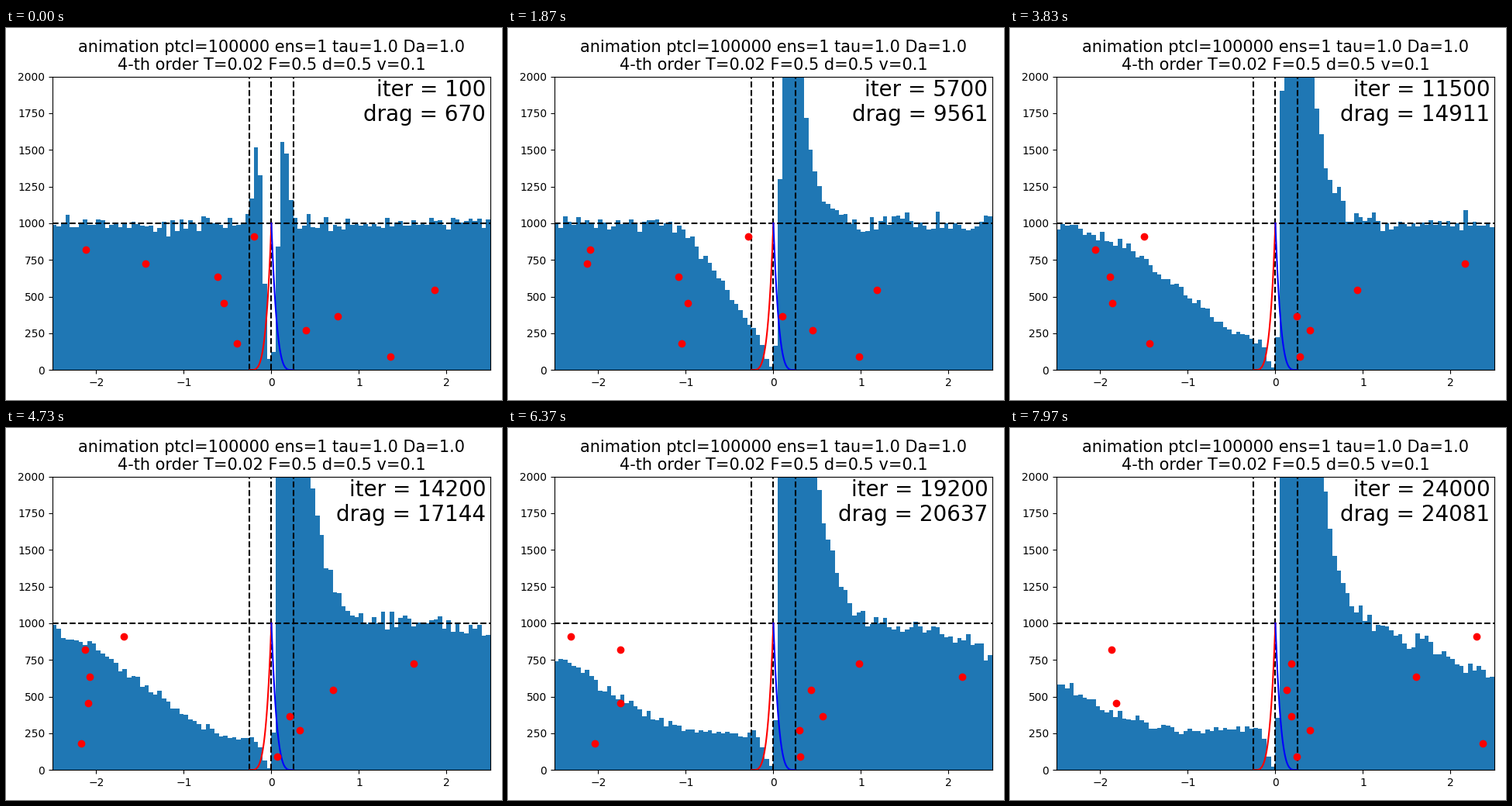
These frames come from a looping animation (640 by 480 pixels, 8 s). A matplotlib script:

```python
import numpy as np
import matplotlib.pyplot as plt
from matplotlib.animation import FuncAnimation

FRAMES, LOOP_MS = 240, 8000
STEP = 0.1                        # simulated time per frame
HALF, BINS, SUB = 2.5, 100, 5     # ring half-length, bars, nodes per bar
TEMP, SPEED, REACH, HEIGHT = 0.02, 0.1, 0.25, 0.125
LEVEL = 1000
GAP = 0.06                        # closest a tracer gets to the barrier
DRAG_FIRST, DRAG_LAST = 670, 24081

# Tracers from bottom to top; ends are unwrapped around the ring
STARTS = [1.36, -0.39, 0.39, 0.76, -0.54, 1.86, -0.61, -1.44, -2.12, -0.2]
ENDS = [0.24, -2.63, 0.39, 0.18, -1.82, 0.13, -3.39, -4.82, -1.87, -2.7]

rng = np.random.default_rng(7)
ticks = np.arange(FRAMES)
progress = ticks / (FRAMES - 1)


def bump(x):
    return np.clip(1 - np.abs(x) / REACH, 0, None) ** 4


def propagator(time, doublings=11):
    """Drift-diffusion over the given time on a periodic grid."""
    n = BINS * SUB
    dx = 2 * HALF / n
    i = np.arange(n)
    right = (i + 1) % n
    energy = HEIGHT * bump((i - n // 2) * dx)
    rise = (energy[right] - energy + SPEED * dx) / TEMP
    rate = TEMP / dx ** 2
    up = rate * rise / np.expm1(rise)
    down = rate * -rise / np.expm1(-rise)
    flow = np.zeros((n, n))
    flow[right, i] += up
    flow[i, i] -= up
    flow[i, right] += down
    flow[right, right] -= down
    step = np.eye(n) + flow * time / 2 ** doublings
    for _ in range(doublings):
        step = step @ step
    return step


def histograms():
    half_step = propagator(STEP / 2)
    step = half_step @ half_step
    density = half_step @ np.full(BINS * SUB, float(LEVEL))
    noise = rng.normal(size=BINS)
    rows = []
    for _ in ticks:
        density = step @ density
        mean = ((density + np.roll(density, -1)) / 2).reshape(BINS, SUB).mean(1)
        noise = 0.3 * noise + 0.95 * rng.normal(size=BINS)
        rows.append(np.clip(np.round(mean + noise * np.sqrt(mean)), 0, None))
    return rows


def bridge(memory, kick):
    """Random wander that starts and finishes at zero."""
    walk = np.zeros(FRAMES)
    for i in ticks[1:]:
        walk[i] = memory * walk[i - 1] + rng.normal(0, kick)
    return walk - walk[-1] * progress


def tracer(start, end):
    """Drift left until the end point is reached, with thermal wander."""
    path = np.maximum(start - SPEED * STEP * ticks, min(start, end))
    path += (end - path[-1]) * progress
    path += bridge(0.95, np.sqrt(2 * TEMP * STEP))
    low = GAP if start > 0 else GAP - 2 * HALF
    high = low + 2 * (HALF - GAP)
    path = low + np.abs(path - low)
    path = high - np.abs(high - path)
    return (path + HALF) % (2 * HALF) - HALF


def drag_counter():
    power = np.log(DRAG_LAST / DRAG_FIRST) / np.log(FRAMES)
    trend = DRAG_FIRST * (ticks + 1) ** power
    return np.round(trend + bridge(0, 1.5) * np.sqrt(trend)).astype(int)


counts = histograms()
dots_x = np.array([tracer(a, b) for a, b in zip(STARTS, ENDS)])
dots_y = LEVEL * np.arange(1, 11) / 11
drag = drag_counter()

fig, ax = plt.subplots(figsize=(6.4, 4.8), dpi=100)
ax.set_xlim(-HALF, HALF)
ax.set_ylim(0, 2 * LEVEL)
ax.set_title("animation ptcl=100000 ens=1 tau=1.0 Da=1.0\n"
             "4-th order T=0.02 F=0.5 d=0.5 v=0.1", fontsize=15)
fig.tight_layout()

bars = ax.stairs(counts[0], np.linspace(-HALF, HALF, BINS + 1), fill=True, color="C0")
for x in (-REACH, 0, REACH):
    ax.axvline(x, color="k", ls="--")
ax.axhline(LEVEL, color="k", ls="--")
side = np.linspace(0, REACH, 100)
ax.plot(-side, LEVEL * bump(side), "r")
ax.plot(side, LEVEL * bump(side), "b")
dots, = ax.plot(dots_x[:, 0], dots_y, "ro")
label = ax.text(0.99, 0.99, "", transform=ax.transAxes, fontsize=20,
                ha="right", va="top", linespacing=1.15)
ax.set_xlim(-HALF, HALF)
ax.set_ylim(0, 2 * LEVEL)


def draw(i):
    bars.set_data(values=counts[i])
    dots.set_xdata(dots_x[:, i])
    label.set_text(f"iter = {100 * (i + 1)}\ndrag = {drag[i]}")
    return bars, dots, label


anim = FuncAnimation(fig, draw, frames=FRAMES, interval=LOOP_MS / FRAMES,
                     repeat=True, repeat_delay=0)
plt.show()
```
